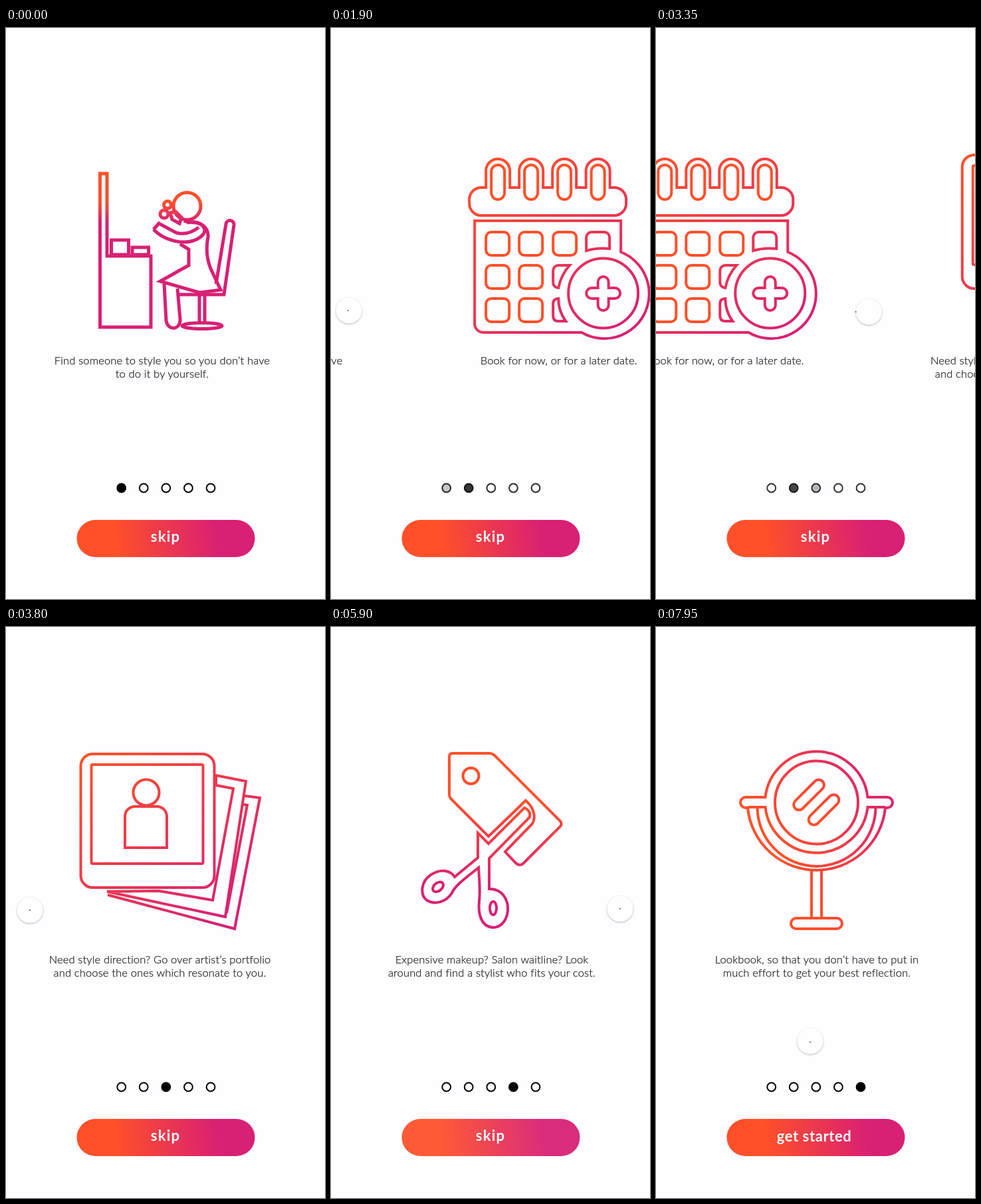
An HTML page that plays this animation: 480 px wide and 859 px high, repeating every 8 s.

```html
<!DOCTYPE html>
<html lang="en">
<head>
<meta charset="utf-8">
<title>Onboarding</title>
<style>
@property --p { syntax: '<number>'; inherits: true; initial-value: 0; }
html, body { margin: 0; height: 100%; overflow: hidden; background: #fefdff; }
svg { display: block; width: 100vw; height: 100vh; }

/* --p is the page position, 0 to 4 */
.stage {
  --s0: clamp(0, var(--p), 1);
  --s1: clamp(0, var(--p) - 1, 1);
  --s2: clamp(0, var(--p) - 2, 1);
  --s3: clamp(0, var(--p) - 3, 1);
  --dip: (var(--s0)*(1 - var(--s0)) + var(--s1)*(1 - var(--s1)) + var(--s2)*(1 - var(--s2)) + var(--s3)*(1 - var(--s3)));
  animation: swipe 8s cubic-bezier(.3333, 0, .6667, 1) infinite;
}
@keyframes swipe {
  0%, 19.2% { --p: 0; }
  25.7%, 39.8% { --p: 1; }
  45.8%, 58.775% { --p: 2; }
  64.775%, 81.2125% { --p: 3; }
  85.8375%, 100% { --p: 4; }
}
.track { transform: translateX(calc(var(--p) * -483px)); }

.icon { fill: none; stroke-width: 4; }
.copy { font: 300 16.5px Lato, 'Open Sans', sans-serif; letter-spacing: .15px; fill: #1c1c1c; stroke: #1c1c1c; stroke-width: .25; text-anchor: middle; }
.label { font: 700 22px Lato, 'Open Sans', sans-serif; fill: #fefdff; text-anchor: middle; }

.ring { fill: none; stroke: #000; stroke-width: 2; opacity: calc(1 - var(--dip)); }
.fill { opacity: max(0, 1 - max(var(--p) - var(--i), var(--i) - var(--p))); }
.skip { opacity: calc(1 - var(--s3) - .06 * var(--s2) * (1 - var(--s3))); }
.start { opacity: var(--s3); }

.touch, .tip { animation: roam 8s linear infinite; }
.tip { animation-delay: -14ms; }
.touch circle { fill: #fffeff; filter: drop-shadow(0 1px 1.5px rgba(0,0,0,.28)); }
@keyframes roam {
  0%, 3% { transform: translate(285px, 890px); animation-timing-function: ease-in-out; }
  16% { transform: translate(429px, 425px); }
  19.2% { transform: translate(429px, 425px); animation-timing-function: cubic-bezier(.333, 0, .667, .625); }
  23.75% { transform: translate(27px, 425px); }
  24.5%, 29% { transform: translate(21px, 425px); animation-timing-function: ease-in-out; }
  37.5% { transform: translate(455px, 427px); }
  39.8% { transform: translate(455px, 427px); animation-timing-function: cubic-bezier(.333, 0, .667, .625); }
  44% { transform: translate(76px, 427px); }
  45%, 48.5% { transform: translate(36px, 426px); animation-timing-function: ease-in-out; }
  56.5% { transform: translate(451px, 422px); }
  58.775% { transform: translate(451px, 422px); animation-timing-function: cubic-bezier(.333, 0, .667, .625); }
  62.975% { transform: translate(72px, 422px); }
  63.9%, 67% { transform: translate(36px, 423px); animation-timing-function: ease-in-out; }
  73%, 75% { transform: translate(435px, 424px); }
  79% { transform: translate(450px, 422px); }
  81.2125% { transform: translate(450px, 422px); animation-timing-function: cubic-bezier(.333, 0, .667, .625); }
  84.375% { transform: translate(56px, 422px); }
  85%, 87.5% { transform: translate(37px, 422px); animation-timing-function: ease-in-out; }
  95.5% { transform: translate(231px, 590px); }
  99.375% { transform: translate(232px, 623px); }
  100% { transform: translate(232px, 628px); }
}
</style>
</head>
<body>
<svg class="stage" viewBox="0 0 480 859" preserveAspectRatio="none">
  <defs>
    <linearGradient id="warm"><stop offset="0" stop-color="#ff5029"/><stop offset="1" stop-color="#d82074"/></linearGradient>
    <linearGradient id="g1" href="#warm" gradientUnits="userSpaceOnUse" x1="0" y1="262" x2="0" y2="292"/>
    <linearGradient id="g2" href="#warm" gradientUnits="userSpaceOnUse" x1="215" y1="195" x2="425" y2="455"/>
    <linearGradient id="g3" href="#warm" gradientUnits="userSpaceOnUse" x1="20" y1="195" x2="220" y2="430"/>
    <linearGradient id="g4" href="#warm" gradientUnits="userSpaceOnUse" x1="0" y1="260" x2="0" y2="390"/>
    <linearGradient id="g5" href="#warm" gradientUnits="userSpaceOnUse" x1="175" y1="320" x2="345" y2="215"/>
    <linearGradient id="gb" href="#warm" gradientUnits="userSpaceOnUse" x1="165" y1="776" x2="320" y2="758"/>
    <rect id="cell" width="35" height="35" rx="8"/>
    <rect id="loop" x="-10" y="206" width="20" height="52" rx="10"/>
    <rect id="gleam" x="-29" y="-8" width="58" height="16" rx="8" transform="rotate(-45)"/>
    <rect id="pill" x="106.5" y="740" width="268" height="56" rx="28" fill="url(#gb)"/>
  </defs>
  <rect width="480" height="859" fill="#fefdff"/>

  <g class="track">
    <g>
      <g class="icon" stroke="url(#g1)" style="stroke-width:5">
        <path d="M141.5 219H152V343H218V450H141.5Z M158.500 341V319H184.500V341Z M190 341V330H214.500V341Z"/>
        <path d="M316 385L331 295A6 6 0 0 1 343 296L328 401H259"/>
        <path d="M291 402V443M299 402V443"/>
        <ellipse cx="295" cy="448" rx="30" ry="4.500"/>
        <circle cx="272.500" cy="268" r="20.500"/>
        <circle cx="243" cy="266" r="5.500"/>
        <circle cx="238" cy="280" r="6"/>
        <path d="M247 278L255 276L264 285L261 294L250 288Z"/>
        <path d="M272 293C290 288 305 299 304 314C300 335 303 350 308 362L323 394L291 398L232 381L275 357V333L262 325"/>
        <path d="M222 303L230 294L256 308C270 312 282 306 290 300M222 303C236 318 262 326 282 320C298 314 304 304 294 296C286 290 274 294 268 290"/>
        <path d="M238 385L241 440C243 456 263 455 262 438L258 392"/>
      </g>
      <text class="copy" x="235" y="506">Find someone to style you so you don’t have</text>
      <text class="copy" x="235" y="525.500">to do it by yourself.</text>
    </g>

    <g transform="translate(483)">
      <g class="icon" stroke="url(#g2)" transform="translate(-82)">
        <path d="M212 240H205A18 18 0 0 0 187 258V264A18 18 0 0 0 205 282H405A18 18 0 0 0 423 264V258A18 18 0 0 0 405 240H398.500V215a18 18 0 0 0-36 0V240H348V215a18 18 0 0 0-36 0V240H298V215a18 18 0 0 0-36 0V240H248V215a18 18 0 0 0-36 0Z"/>
        <use href="#loop" x="230"/><use href="#loop" x="280"/><use href="#loop" x="330"/><use href="#loop" x="380.500"/>
        <path d="M415 337V290H195V445a13 13 0 0 0 13 13H356A67.500 67.500 0 1 0 415 337Z"/>
        <use href="#cell" x="212" y="307"/><use href="#cell" x="262" y="307"/><use href="#cell" x="313" y="307"/>
        <use href="#cell" x="212" y="357"/><use href="#cell" x="262" y="357"/>
        <use href="#cell" x="212" y="407"/><use href="#cell" x="262" y="407"/>
        <path d="M363 335V315a8 8 0 0 1 8-8H390a8 8 0 0 1 8 8V332Q380 330 363 335Z"/>
        <path d="M338 357H321a8 8 0 0 0-8 8V383a8 8 0 0 0 8 8Q325 371 338 357Z"/>
        <path d="M321 407q-8 0-8 8v18q0 8 8 8h11Q321 426 321 407Z"/>
        <circle cx="388.500" cy="399" r="52.500"/>
        <path d="M380.500 391V382a8 8 0 0 1 16 0V391H406a8 8 0 0 1 0 16H396.500V417a8 8 0 0 1-16 0V407H371a8 8 0 0 1 0-16Z"/>
      </g>
      <text class="copy" x="239.500" y="506">Book for now, or for a later date.</text>
    </g>

    <g transform="translate(966)">
      <g class="icon" stroke="url(#g3)" transform="translate(110)">
        <rect x="2.500" y="191" width="201" height="201" rx="18"/>
        <rect x="18.500" y="207" width="168" height="149" rx="2"/>
        <circle cx="101" cy="249" r="19.500"/>
        <path d="M69 332V285a15 15 0 0 1 15-15H117a15 15 0 0 1 15 15V332Z"/>
        <path d="M205 223L251 232L220 436L42 398L120 397L201 411L232 243L206 238V224"/>
        <path d="M249 254L272 257L234 454L43 403M247 267L253 268L222 430"/>
      </g>
      <text class="copy" x="231.500" y="506">Need style direction? Go over artist’s portfolio</text>
      <text class="copy" x="231.500" y="525.500">and choose the ones which resonate to you.</text>
    </g>

    <g transform="translate(1449)">
      <g class="icon" stroke="url(#g4)">
        <path d="M237 315L180 258Q178 255 178 251V195Q178 190 183 190H238Q243 190 247 194L345 292Q348 296 345 300L290 355Q284 361 278 355L262 338L302 297C309 288 306 272 293 261Z"/>
        <circle cx="210.500" cy="224" r="12"/>
        <path d="M221 310L237 326L291 272Q301 276 299 286L238 348V394C258 394 267 410 266 427C264 445 253 452 244 452C226 451 221 432 223 412C225 396 223 380 222 362C205 376 187 388 182 400C174 413 157 419 144 411C133 402 136 382 150 373C165 363 180 366 186 376L221 347Z"/>
        <ellipse cx="161" cy="391" rx="9" ry="6" transform="rotate(-40 161 391)"/>
        <ellipse cx="244" cy="423" rx="5" ry="10"/>
      </g>
      <text class="copy" x="242" y="506">Expensive makeup? Salon waitline? Look</text>
      <text class="copy" x="242" y="525.500">around and find a stylist who fits your cost.</text>
    </g>

    <g transform="translate(1932)">
      <g class="icon" stroke="url(#g5)">
        <circle cx="241.500" cy="264" r="62.500"/>
        <path d="M164.500 256A77.500 77.500 0 0 1 318.500 256H348a8 8 0 0 1 0 16H345A104 104 0 0 1 138 272H135a8 8 0 0 1 0-16Z"/>
        <path d="M138 271H164.500A77.500 77.500 0 0 0 318.500 271H345M152.500 271A89 89 0 0 0 330.500 271"/>
        <use href="#gleam" transform="translate(230 252.500)"/>
        <use href="#gleam" transform="translate(252.500 275)"/>
        <path d="M234 367V438M249 367V438"/>
        <rect x="203" y="438" width="77" height="16" rx="8"/>
      </g>
      <text class="copy" x="242" y="506">Lookbook, so that you don’t have to put in</text>
      <text class="copy" x="242" y="525.500">much effort to get your best reflection.</text>
    </g>
  </g>

  <g class="dots">
    <g style="--i:0" transform="translate(173.700 692)"><circle class="fill" r="6.500"/><circle class="ring" r="6.400"/></g>
    <g style="--i:1" transform="translate(207.200 692)"><circle class="fill" r="6.500"/><circle class="ring" r="6.400"/></g>
    <g style="--i:2" transform="translate(240.800 692)"><circle class="fill" r="6.500"/><circle class="ring" r="6.400"/></g>
    <g style="--i:3" transform="translate(274.400 692)"><circle class="fill" r="6.500"/><circle class="ring" r="6.400"/></g>
    <g style="--i:4" transform="translate(308 692)"><circle class="fill" r="6.500"/><circle class="ring" r="6.400"/></g>
  </g>

  <g class="skip"><use href="#pill"/><text class="label" x="240" y="773" letter-spacing="1.2">skip</text></g>
  <g class="start"><use href="#pill"/><text class="label" x="238" y="774" letter-spacing=".6">get started</text></g>

  <g class="touch"><circle r="19.500"/></g>
  <g class="tip"><circle r=".9" fill="#333"/></g>
</svg>
</body>
</html>
```
